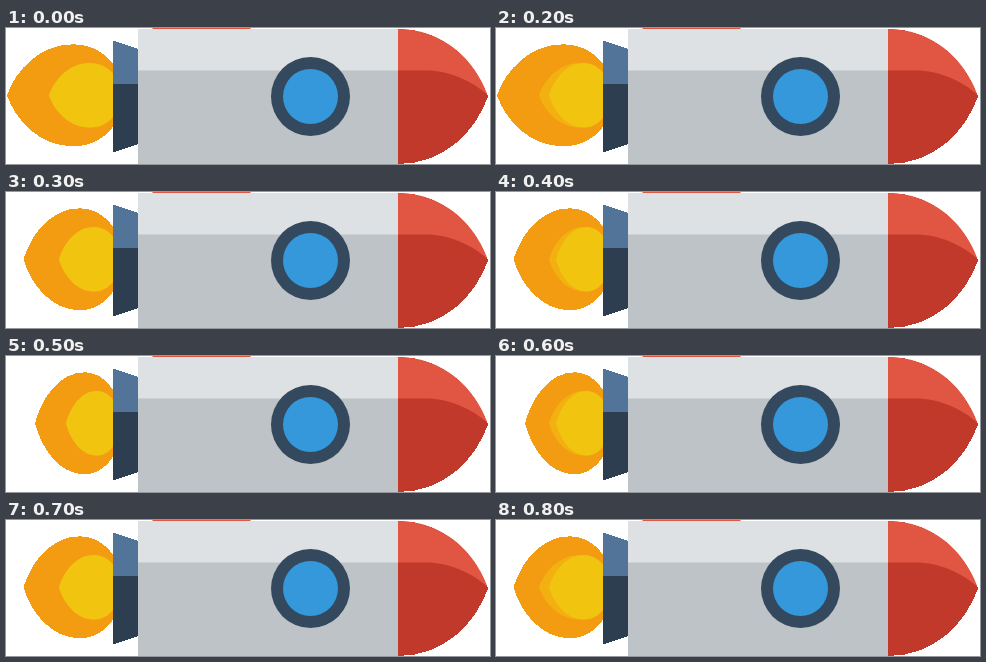
Write an HTML page that moves like this. It is 484 px wide and 136 px high and loops after 900 ms.

```html
<!DOCTYPE html>
<html lang="en">
<head>
<meta charset="utf-8">
<title>Rocket</title>
<style>
html, body { margin: 0; width: 100%; height: 100%; overflow: hidden; background: #fff; }
svg { display: block; width: 484px; height: 136px; }
</style>
</head>
<body>
<svg viewBox="0 0 484 136">
  <defs>
    <!-- unit flame: tip at x = -1, root at x = 0 -->
    <path id="leaf" d="M-1 0C-.92-.5-.7-1-.4-1C-.22-1-.08-.8 0-.5V.5C-.08.8-.22 1-.4 1C-.7 1-.92.5-1 0Z"/>
  </defs>
  <use id="outer" href="#leaf" fill="#f39c12" shape-rendering="crispEdges"/>
  <use id="glow" href="#leaf" fill="#f2b011"/>
  <use id="core" href="#leaf" fill="#f1c40f"/>

  <g shape-rendering="crispEdges">
    <path fill="#fff" d="M107 0H132V136H107Z"/>
    <path fill="#527499" d="M107 12.5L132 21V56H107Z"/>
    <path fill="#2c3e50" d="M107 56H132V116L107 124.5Z"/>
    <path fill="#c0392b" d="M392 1C437 1 469 32 482 68.5C469 105 437 136 392 136Z"/>
  </g>
  <path fill="#e15642" d="M392 1C437 1 469 32 481.3 66.5C465 52.5 443 42.5 420 42.5H392Z"/>

  <path fill="#bdc3c7" d="M132 1H392V136H132Z"/>
  <path fill="#dee1e3" d="M132 1H392V42.5H132Z"/>
  <path fill="#e05640" d="M146.5 0H244.5V1H146.5Z"/>

  <circle cx="304.5" cy="68.5" r="39.5" fill="#34495e"/>
  <circle cx="304.5" cy="68.5" r="27.5" fill="#3498db"/>
</svg>
<script>
const ROOT = 111, MIDDLE = 67.3, STEP = 100, LOOP = 900;

// How far the flame has shrunk: 0, 1, 2 and back, two steps each
const level = n => 2 - Math.abs(2 - Math.max(0, Math.floor((n - 1) / 2)));
const outerTip = l => 1 + 19 * l - 2.5 * l * l;
const innerTip = l => 43 + 11.5 * l - 1.5 * l * l;

function place(id, tip, height) {
  document.getElementById(id).setAttribute("transform",
    `translate(${ROOT} ${MIDDLE}) scale(${ROOT - tip} ${height})`);
}

function draw(now) {
  const n = Math.floor(now % LOOP / STEP);
  const here = level(n), next = level(n + 1);
  place("outer", outerTip(here), 51);
  // The inner flame changes half a beat early and leaves a glow behind
  place("glow", innerTip(Math.min(here, next)), 32.3);
  place("core", innerTip(Math.max(here, next)), 32.3);
  requestAnimationFrame(draw);
}
draw(performance.now());
</script>
</body>
</html>
```
